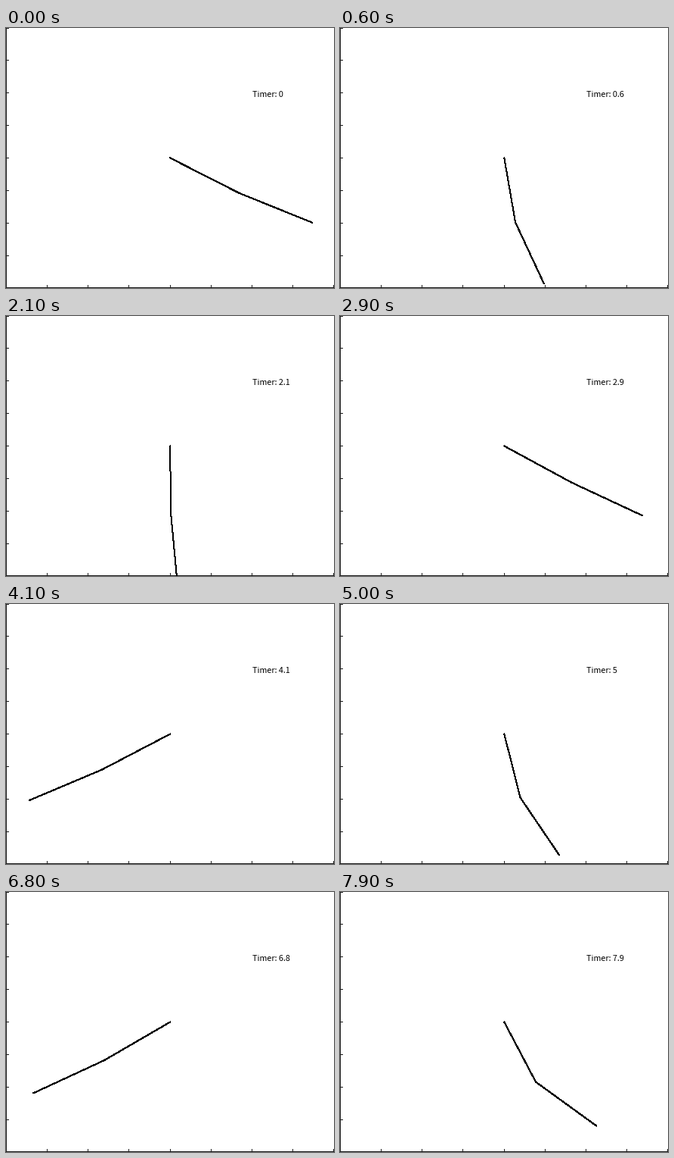
These frames come from a looping animation (434 by 343 pixels, 8 s). A matplotlib script:

```python
import numpy as np
import matplotlib.pyplot as plt
from matplotlib.animation import FuncAnimation
from matplotlib.patches import Rectangle

W, H, DPI = 434, 343, 128
PX = 72 / DPI                    # one pixel in points
FRAMES, DT, SUB = 80, 0.1, 20

G = 9.81                         # equal masses, both rods of length 1
START = [1.0, 1.1, 0.0, 0.0]     # two angles, two angular speeds
CX, CY = 217.3, 171.5            # pivot
SX, SY = 108.4, 85.7             # pixels per unit length


def slope(s):
    a, b, u, v = s
    sn, cs = np.sin(a - b), np.cos(a - b)
    p = -sn * v * v - 2 * G * np.sin(a)
    q = sn * u * u - G * np.sin(b)
    det = 2 - cs * cs
    return np.array([u, v, (p - cs * q) / det, (2 * q - cs * p) / det])


def rk4(s, h):
    k1 = slope(s)
    k2 = slope(s + h / 2 * k1)
    k3 = slope(s + h / 2 * k2)
    k4 = slope(s + h * k3)
    return s + h / 6 * (k1 + 2 * k2 + 2 * k3 + k4)


def swing():
    """Both rod angles for every frame."""
    s = np.array(START)
    angles = [s[:2]]
    for _ in range(FRAMES - 1):
        for _ in range(SUB):
            s = rk4(s, DT / SUB)
        angles.append(s[:2])
    return np.array(angles)


angles = swing()
path_x = CX + SX * np.cumsum(np.sin(angles), axis=1)
path_y = CY + SY * np.cumsum(np.cos(angles), axis=1)

fig = plt.figure(figsize=(W / DPI, H / DPI), dpi=DPI, facecolor="white")
ax = fig.add_axes([0, 0, 1, 1])
ax.set_xlim(0, W)
ax.set_ylim(H, 0)
ax.axis("off")


def bar(x, y, w, h):
    ax.add_patch(Rectangle((x, y), w, h, fc="#1c1c1c", lw=0, antialiased=False))


bar(0, 0, 1, H)
bar(0, H - 1, W, 1)
for i in range(9):
    tx = int(i * (W - 1) / 8 + 0.5)
    ty = min(max(171 + 43 * (i - 4), 0), H - 1)
    bar(tx, H - 4, 1, 4)
    bar(0, ty, 4, 1)

arm, = ax.plot([], [], color="black", lw=PX, antialiased=False)
label = ax.text(326, 91, "", fontsize=10.8 * PX, family="Noto Sans CJK JP",
                color="black", va="baseline")


def draw(i):
    arm.set_data(np.r_[CX, path_x[i]], np.r_[CY, path_y[i]])
    label.set_text(f"Timer: {i * DT:.2g}")
    return arm, label


anim = FuncAnimation(fig, draw, frames=FRAMES, interval=100, repeat=True,
                     repeat_delay=0, blit=False)
plt.show()
```
